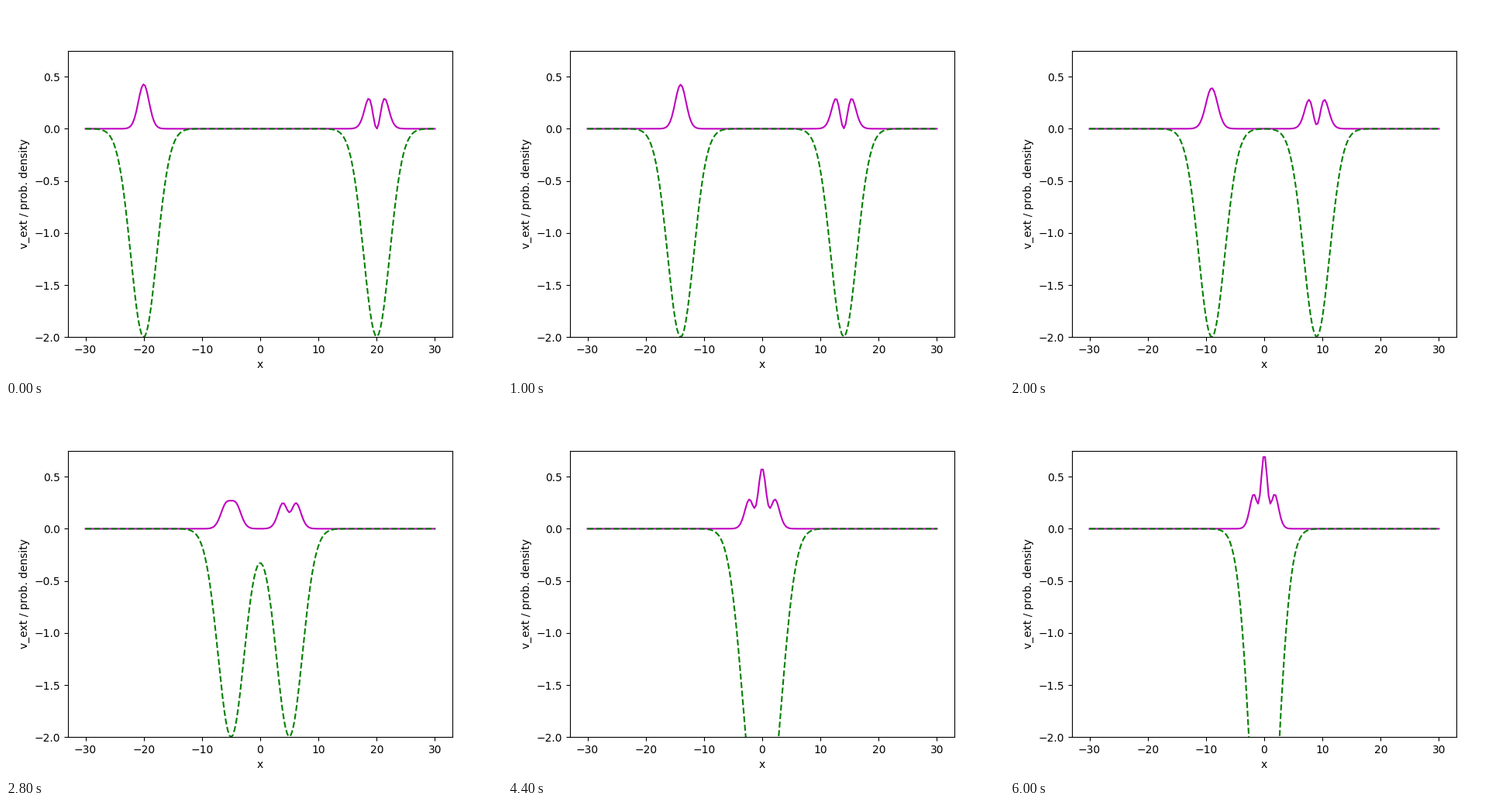
A matplotlib script that plays this animation: 640x480 px, repeating every 7 s.

```python
import numpy as np
import matplotlib.pyplot as plt
from matplotlib.animation import FuncAnimation

# Two interacting spinless electrons in a pair of Gaussian wells that merge.
N = 200          # grid points
M = 32           # orbitals in the configuration basis
STEP_MS = 200
HOLD = 4         # extra steps on the last picture

x = np.linspace(-30, 30, N)
h = x[1] - x[0]
gap = np.abs(x[:, None] - x[None, :])
repulsion = 1 / (1 + gap)

# Half distance between the wells: the steps get finer as they meet.
half_dist = np.concatenate([
    [20.0],
    np.arange(18, 5, -1.0),
    np.arange(5, 2, -0.5),
    np.linspace(2, 0, 11),
])


def kinetic():
    k = np.arange(N)
    diff = k[:, None] - k[None, :]
    sign = 1 - 2 * (np.abs(diff) % 2)
    safe = np.where(diff == 0, 1, diff)
    return np.where(diff == 0, np.pi**2 / 6, sign / safe**2) / h**2


T = kinetic()
I, J = np.triu_indices(M, 1)
row_i, row_j = I[:, None], J[:, None]


def potential(d):
    # the right well is very slightly shallower
    left = 2.0 * np.exp(-0.1 * (x + d) ** 2)
    right = 1.995 * np.exp(-0.1 * (x - d) ** 2)
    return -left - right


def density(v):
    """Density of the first excited two-electron state."""
    energy, orb = np.linalg.eigh(T + np.diag(v))
    energy, orb = energy[:M], orb[:, :M]
    pairs = (orb[:, :, None] * orb[:, None, :]).reshape(N, M * M)
    w = (pairs.T @ repulsion @ pairs).reshape(M, M, M, M)
    ham = w[row_i, I, row_j, J] - w[row_i, J, row_j, I]
    ham += np.diag(energy[I] + energy[J])
    state = np.linalg.eigh(ham)[1][:, 1]
    amp = np.zeros((M, M))
    amp[I, J] = state
    amp[J, I] = -state
    return ((orb @ amp) ** 2).sum(axis=1) / h


wells = [potential(d) for d in half_dist]
clouds = [density(v) for v in wells]

fig, ax = plt.subplots(figsize=(6.4, 4.8), dpi=100)
cloud_line, = ax.plot(x, clouds[0], "m-", lw=1.5)
well_line, = ax.plot(x, wells[0], "g--", lw=1.5)
ax.set_xlim(-33, 33)
ax.set_ylim(-2, 0.75)
ax.set_xlabel("x")
ax.set_ylabel("v_ext / prob. density")


def update(i):
    k = min(i, len(half_dist) - 1)
    cloud_line.set_ydata(clouds[k])
    well_line.set_ydata(wells[k])
    return cloud_line, well_line


anim = FuncAnimation(fig, update, frames=len(half_dist) + HOLD,
                     interval=STEP_MS, repeat=True)
plt.show()
```
